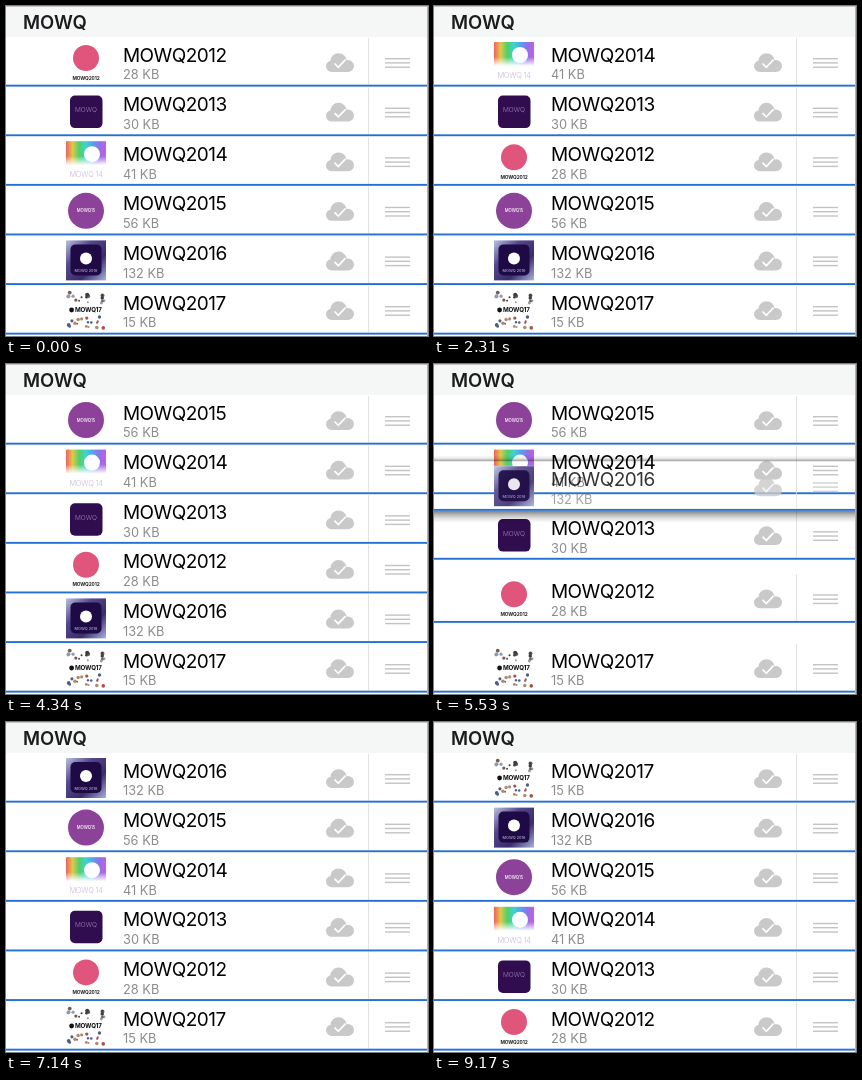
Recreate the animation shown at these times as an HTML page with a canvas. Size 422 px wide and 330 px high, loop 9.24 s.

```html
<!DOCTYPE html>
<html lang="en">
<head>
<meta charset="utf-8">
<title>Reordering a list</title>
<style>
  html, body { margin: 0; width: 100%; height: 100%; overflow: hidden; background: #fff; }
  canvas { display: block; width: 422px; height: 330px; }
</style>
</head>
<body>
<canvas id="stage"></canvas>
<script>
const W = 422, H = 330, LOOP = 9240, STEP = 70;
const TOP = 31, ROW = 49.6, SHIFT = 260;
const FONT = 'Inter, Roboto, sans-serif';
const EVENT = 'MOWQ';

const canvas = document.getElementById('stage');
const ctx = canvas.getContext('2d');
const dpr = window.devicePixelRatio || 1;
canvas.width = W * dpr;
canvas.height = H * dpr;

const clamp = x => Math.min(1, Math.max(0, x));
const smooth = x => x * x * (3 - 2 * x);
const mix = (a, b, p) => a + (b - a) * p;
const settle = x => (smooth(x) + 1 - (1 - x) ** 2) / 2;

function fillBox(x, y, w, h, color) {
  ctx.fillStyle = color;
  ctx.fillRect(x, y, w, h);
}

function disc(x, y, r, color) {
  ctx.fillStyle = color;
  ctx.beginPath();
  ctx.arc(x, y, r, 0, Math.PI * 2);
  ctx.fill();
}

function roundBox(x, y, size, r, color) {
  ctx.fillStyle = color;
  ctx.beginPath();
  ctx.roundRect(x, y, size, size, r);
  ctx.fill();
}

function text(str, x, y, size, color, weight = 400, spacing = 0, align = 'left') {
  ctx.font = `${weight} ${size}px ${FONT}`;
  ctx.letterSpacing = spacing + 'px';
  ctx.textAlign = align;
  ctx.fillStyle = color;
  ctx.fillText(str, x, y);
}

const label = (str, y, size, color, weight, spacing) =>
  text(str, 20, y, size, color, weight, spacing, 'center');

function gradient(x0, y0, x1, y1, colors) {
  const g = ctx.createLinearGradient(x0, y0, x1, y1);
  colors.forEach((c, i) => g.addColorStop(i / (colors.length - 1), c));
  return g;
}

// Thumbnails, each on a 40 x 40 tile
function thumb2012() {
  disc(20, 16, 13, '#e0557c');
  label(EVENT + '2012', 37.5, 4.8, '#222', 700, -0.1);
}

function thumb2013() {
  roundBox(4, 4, 32.5, 5, '#2f0d4f');
  label(EVENT, 20.5, 6.5, '#a080b4', 300);
}

function thumb2014() {
  fillBox(0, 0, 40, 24, gradient(0, 0, 40, 0,
    ['#f4605c', '#dcc94c', '#4fd068', '#40d2d2', '#56a0ee', '#8d72ea', '#c85ce0']));
  fillBox(0, 15, 40, 10, gradient(0, 15, 0, 24, ['#ffffff00', '#fff']));
  disc(26, 13, 8, '#fff');
  label(EVENT + ' 14', 36, 7.4, '#c9b8da', 300, -0.2);
}

function thumb2015() {
  disc(20, 20, 18, '#8c4299');
  label(EVENT + '15', 21.5, 4.2, '#fff', 500);
}

function thumb2016() {
  fillBox(0, 0, 40, 40, gradient(0, 0, 40, 40, ['#b9c2e2', '#54488c', '#3a2c6c', '#a9b4dc']));
  roundBox(4.5, 4, 31, 5, '#1e0b45');
  disc(20, 18, 6, '#fff');
  label(EVENT + ' 2016', 31.5, 3.8, '#b8a8d0', 500);
}

function thumb2017() {
  const colors = ['#7a5a4a', '#4d5f86', '#3b3b42', '#b08a70', '#8f9bb0', '#a8524a'];
  let seed = 11;
  const rnd = () => (seed = seed * 16807 % 2147483647) / 2147483647;
  for (let i = 0; i < 34; i++) {
    const band = i % 2 ? 27 : 2;
    disc(2 + rnd() * 36, band + rnd() * 11, 0.9 + rnd() * 1.2, colors[i % colors.length]);
  }
  disc(5.6, 20, 2.4, '#111');
  text(EVENT + '17', 9, 22.4, 6.2, '#111', 700, -0.15);
}

const items = [
  ['2012', '28 KB', thumb2012],
  ['2013', '30 KB', thumb2013],
  ['2014', '41 KB', thumb2014],
  ['2015', '56 KB', thumb2015],
  ['2016', '132 KB', thumb2016],
  ['2017', '15 KB', thumb2017]
];

// Drag profiles: progress as a function of time, and its inverse
const easeOut = d => ({
  at: t => 1 - (1 - clamp(t / d)) ** 3,
  when: p => d * (1 - Math.cbrt(1 - p))
});

function knots(list) {
  const look = (v, a, b) => {
    if (v <= list[0][a]) return list[0][b];
    for (let i = 1; i < list.length; i++) {
      const k = list[i - 1], n = list[i];
      if (v <= n[a]) return mix(k[b], n[b], (v - k[a]) / (n[a] - k[a]));
    }
    return list[list.length - 1][b];
  };
  return { at: t => look(t, 0, 1), when: p => look(p, 1, 0) };
}

// Each move takes the row in slot `from` to the top
const moves = [
  { from: 1, start: 170, end: 700, drag: easeOut(420) },
  { from: 2, start: 1780, end: 2310, drag: easeOut(420) },
  { from: 3, start: 3420, end: 4340, drag: easeOut(832) },
  { from: 4, start: 5375, end: 6230, drag: easeOut(506) },
  { from: 5, start: 7360, end: 8610,
    drag: knots([[0, 0], [120, 0.1], [350, 0.54], [580, 0.74], [620, 0.833], [1000, 1]]) }
];

function cloud() {
  ctx.fillStyle = '#c9c9c9';
  ctx.beginPath();
  for (const [x, y, r] of [[325.7, 29.3, 5.7], [332.5, 24.4, 8.2], [342, 29, 6]]) {
    ctx.moveTo(x + r, y);
    ctx.arc(x, y, r, 0, Math.PI * 2);
  }
  ctx.rect(325.7, 27, 16.3, 8);
  ctx.fill();
  ctx.strokeStyle = '#fff';
  ctx.lineWidth = 1.7;
  ctx.beginPath();
  ctx.moveTo(328.5, 26.5);
  ctx.lineTo(332.3, 30.3);
  ctx.lineTo(339.5, 22.7);
  ctx.stroke();
}

function row([year, size, thumb], slot, lift = 0) {
  ctx.save();
  ctx.translate(0, TOP + slot * ROW);
  if (lift) shadow(lift);
  ctx.globalAlpha = 1 - 0.1 * lift;
  ctx.save();
  ctx.translate(60, 5);
  if (lift) fillBox(0, 0, 40, 40, '#fff');
  thumb();
  ctx.restore();
  ctx.globalAlpha = 1 - 0.2 * lift;
  text(EVENT + year, 117, 24.5, 19, '#000', 400, -0.55);
  text(size, 117, 42.4, 12.8, '#8c8c8c');
  cloud();
  fillBox(362, 1, 1, ROW - 3, '#e2e2e2');
  for (const y of [21, 25.2, 29.5]) fillBox(379, y, 25, 1.4, '#c3c3c3');
  ctx.globalAlpha = 1;
  fillBox(0, ROW - 1.9, W, 1.9, '#2570d4');
  ctx.restore();
}

function shadow(lift) {
  ctx.globalAlpha = lift;
  fillBox(0, -6, W, 6, gradient(0, -6, 0, 0, ['#0000', 'rgba(0,0,0,.08)', 'rgba(0,0,0,.38)']));
  fillBox(0, ROW, W, 12, gradient(0, ROW, 0, ROW + 12,
    ['rgba(0,0,0,.5)', 'rgba(0,0,0,.27)', 'rgba(0,0,0,.1)', '#0000']));
}

function header() {
  fillBox(0, 0, W, TOP, '#f5f6f6');
  fillBox(0, 0, W, 1, '#c2c2c2');
  text(EVENT, 17, 23, 18.5, '#1c1c1e', 600);
}

function draw(t) {
  ctx.setTransform(dpr, 0, 0, dpr, 0, 0);
  fillBox(0, 0, W, H, '#fff');

  const order = items.slice();
  let active = null;
  for (const m of moves) {
    if (t < m.start) break;
    if (t < m.end) {
      active = m;
      break;
    }
    order.unshift(order.splice(m.from, 1)[0]);
  }

  if (!active) {
    order.forEach((item, i) => row(item, i));
  } else {
    const { from, start, end, drag } = active;
    const age = t - start;
    order.forEach((item, i) => {
      if (i === from) return;
      // A row steps down once the dragged one is nearly level with it
      const shift = i < from
        ? settle(clamp((age - drag.when((from - i - 0.3) / from)) / SHIFT)) : 0;
      row(item, i + shift);
    });
    const lift = Math.min(clamp(age / 100), clamp((end - t) / 150));
    row(order[from], from * (1 - drag.at(age)), lift);
  }

  header();
  fillBox(W - 1, 0, 1, H, '#b2b2b2');
}

const begin = performance.now();
function tick() {
  const t = (performance.now() - begin) % LOOP;
  draw(Math.floor(t / STEP) * STEP);
  requestAnimationFrame(tick);
}
tick();
</script>
</body>
</html>
```
